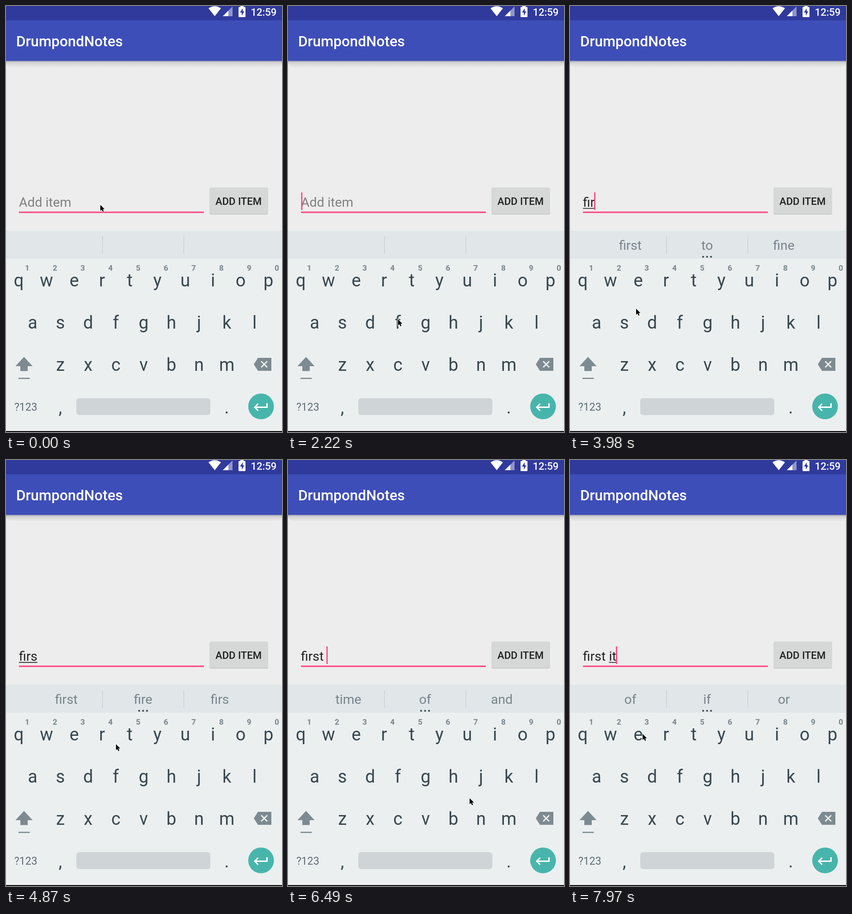
An HTML page with a canvas that plays this animation: 597x919 px, repeating every 8 s.

```html
<!DOCTYPE html>
<html lang="en">
<head>
<meta charset="utf-8">
<title>Task list typing</title>
<style>
  html, body { margin: 0; width: 100%; height: 100%; overflow: hidden; background: #ededed; }
  canvas { display: block; }
</style>
</head>
<body>
<canvas id="stage" width="597" height="919"></canvas>
<script>
const ctx = document.getElementById('stage').getContext('2d');
const LOOP = 8000;
const STEP = 147.5;
const PITCH = 60;
const PINK = '#ff4081';
const KEY = '#37474f';
const ICON = '#7d8b90';
const PANEL = '#eceff0';

const PHRASE = 'first it';
const PRESSES = [16, 22, 25, 28, 35, 42, 46, 51];
const HINTS = ['', 'for of from', 'for of first', 'first to fine', 'first fire firs',
  'firsts firstly firsthand', 'time of and', 'in I is', 'of if or'].map(s => s.split(' '));

// Baseline position of every letter, by key
const keys = { ' ': { x: 338, y: 874 } };
['qwertyuiop', 'asdfghjkl', 'zxcvbnm'].forEach((row, r) =>
  [...row].forEach((k, i) => {
    keys[k] = { x: 27.6 + [0, 0.5, 1.5][r] * PITCH + i * PITCH, y: 605 + r * 91 };
  }));

const over = (at, k) => ({ at, x: keys[k].x, y: keys[k].y - 10 });

// The pointer visits each pressed key, with a few pauses on the way
const route = [
  { at: 0, x: 204, y: 429 }, { at: 2, x: 206, y: 435 },
  over(7, 'j'), over(8, 'j'), { at: 15, x: 238, y: 676 },
  { at: 20, x: 432, y: 598 }, { at: 27, x: 143, y: 653 },
  { at: 40, x: 337, y: 858 }, { at: 48, x: 232, y: 611 },
  { at: 54, x: 157, y: 591 },
  ...PRESSES.map((at, i) => over(at, PHRASE[i]))
].sort((a, b) => a.at - b.at);

function rect(x, y, w, h, color, r = 0) {
  ctx.fillStyle = color;
  ctx.beginPath();
  ctx.roundRect(x, y, w, h, r);
  ctx.fill();
}

function disc(x, y, r, color) {
  ctx.fillStyle = color;
  ctx.beginPath();
  ctx.arc(x, y, r, 0, Math.PI * 2);
  ctx.fill();
}

function shape(d, color) {
  ctx.fillStyle = color;
  ctx.fill(new Path2D(d));
}

function line(d, color, width) {
  ctx.strokeStyle = color;
  ctx.lineWidth = width;
  ctx.stroke(new Path2D(d));
}

function label(str, x, y, size, color, align = 'left', weight = 400) {
  ctx.font = `${weight} ${size}px Roboto, sans-serif`;
  ctx.textAlign = align;
  ctx.fillStyle = color;
  ctx.fillText(str, x, y);
}

function drawHeader() {
  const shade = ctx.createLinearGradient(0, 118, 0, 132);
  shade.addColorStop(0, '#acacb0');
  shade.addColorStop(0.35, '#d6d6d6');
  shade.addColorStop(1, '#e9e9e9');
  rect(0, 112, 597, 20, shade, [0, 0, 12, 12]);
  rect(0, 0, 597, 31, '#303a9d');
  rect(0, 31, 597, 87.5, '#3e4eb8');
  label('DrumpondNotes', 22, 87, 31.4, '#fff', 'left', 500);

  shape('M451.5 22 L438 5 Q451.5 -4 465 5 Z', '#fff');
  shape('M469 22 L490 1 V22 Z', '#8f95cb');
  shape('M469 22 L481 10 V22 Z', '#fff');
  rect(507, 0, 7, 4, '#fff');
  rect(503, 2, 15, 22, '#fff', 1.5);
  shape('M512 5 L506 14 H510 V21 L515.5 11.5 H512 Z', '#303a9d');
  label('12:59', 529.5, 21, 22, '#fff', 'left', 500);
}

function drawButton() {
  rect(440, 393, 127, 57, '#c6c6c6', 4);
  rect(440, 391.5, 127, 57, '#d6d7d7', 4);
  label('ADD ITEM', 503, 429, 22, '#1f1f1f', 'center', 500);
}

function drawKeyboard() {
  rect(0, 485, 597, 61, '#e1e6e9');
  rect(0, 545, 597, 372, PANEL);
  rect(0, 917, 597, 2, '#000');
  for (const x of [208, 384]) rect(x, 497, 1.2, 38, '#c5cccf');

  for (const k in keys) label(k, keys[k].x, keys[k].y, 38, KEY, 'center');
  for (let i = 0; i < 10; i++)
    label((i + 1) % 10, 46 + i * PITCH, 571, 17, '#78868c', 'center', 700);
  label('?123', 18, 873, 23, '#5f6e75');
  label(',', 117.5, 879, 38, KEY, 'center');
  label('.', 477.5, 879, 38, KEY, 'center');
  rect(152, 846, 290, 36.5, '#cfd5d7', 6);

  // Shift
  shape('M39 757 L57.5 777 H20.5 Z', ICON);
  rect(31, 776, 16, 11.5, ICON);
  rect(27, 802, 24.5, 2.6, ICON);

  // Delete
  shape('M536 773 L545 759 H574 V787 H545 Z', ICON);
  line('M552 766.5 l13 13 m0 -13 l-13 13', PANEL, 2.8);

  // Enter
  disc(551.7, 863.8, 27.8, '#48b5ac');
  line('M564.5 857 v8.5 H539 m6.5 -7.5 l-7.5 7.5 l7.5 7.5', '#fff', 3);
}

function drawHints(count) {
  if (!count) return;
  HINTS[count].forEach((word, i) => {
    const bold = word === 'I';
    label(word, 130.5 + i * 166, 526, 28.3, bold ? KEY : '#78838a', 'center', bold ? 700 : 400);
    disc(288 + i * 8.5, 541, 2.1, KEY);
  });
}

function drawField(text, caretOn) {
  const left = 28;
  const word = text.lastIndexOf(' ') + 1;
  const fix = text.slice(word) === 'i';
  rect(left, 443.5, 400, 3, PINK);
  label(text || 'Add item', left, 433, 28.3, text ? '#212121' : '#808080');
  const end = left + ctx.measureText(text).width;
  const start = left + ctx.measureText(text.slice(0, word)).width;
  rect(start, 435.8, end - start, fix ? 3 : 1.6, fix ? '#29a9e6' : '#212121');
  if (caretOn) rect(Math.max(28.5, end - 1), 402, 2.6, 38, PINK);
}

function pointerAt(step) {
  const i = route.findIndex(p => p.at > step);
  if (i < 0) return route[route.length - 1];
  const a = route[i - 1], b = route[i];
  const u = (step - a.at) / (b.at - a.at);
  const e = u * u * (3 - 2 * u);
  return { x: a.x + (b.x - a.x) * e, y: a.y + (b.y - a.y) * e };
}

function drawPointer({ x, y }) {
  const arrow = 'M0 0 V13 L3 10.4 L5.2 15 L7.4 14 L5.3 9.5 L9.3 9.3 Z';
  ctx.save();
  ctx.translate(x, y);
  line(arrow, '#fff', 1.6);
  shape(arrow, '#000');
  ctx.restore();
}

function draw(t) {
  const step = Math.floor((t + 3) / STEP);
  const typedBy = s => PRESSES.filter(p => p <= s).length;
  const count = typedBy(step);
  // The caret blinks every half second and restarts with each key
  const since = (step - (count ? PRESSES[count - 1] : 1)) * STEP;
  const caretOn = since >= 0 && since % 1000 < 500;

  rect(0, 0, 597, 919, '#ededed');
  drawHeader();
  drawButton();
  drawField(PHRASE.slice(0, count), caretOn);
  drawKeyboard();
  drawHints(typedBy(step - 1));
  drawPointer(pointerAt(step));
}

const began = performance.now();
function tick() {
  draw((performance.now() - began) % LOOP);
  requestAnimationFrame(tick);
}
tick();
</script>
</body>
</html>
```
